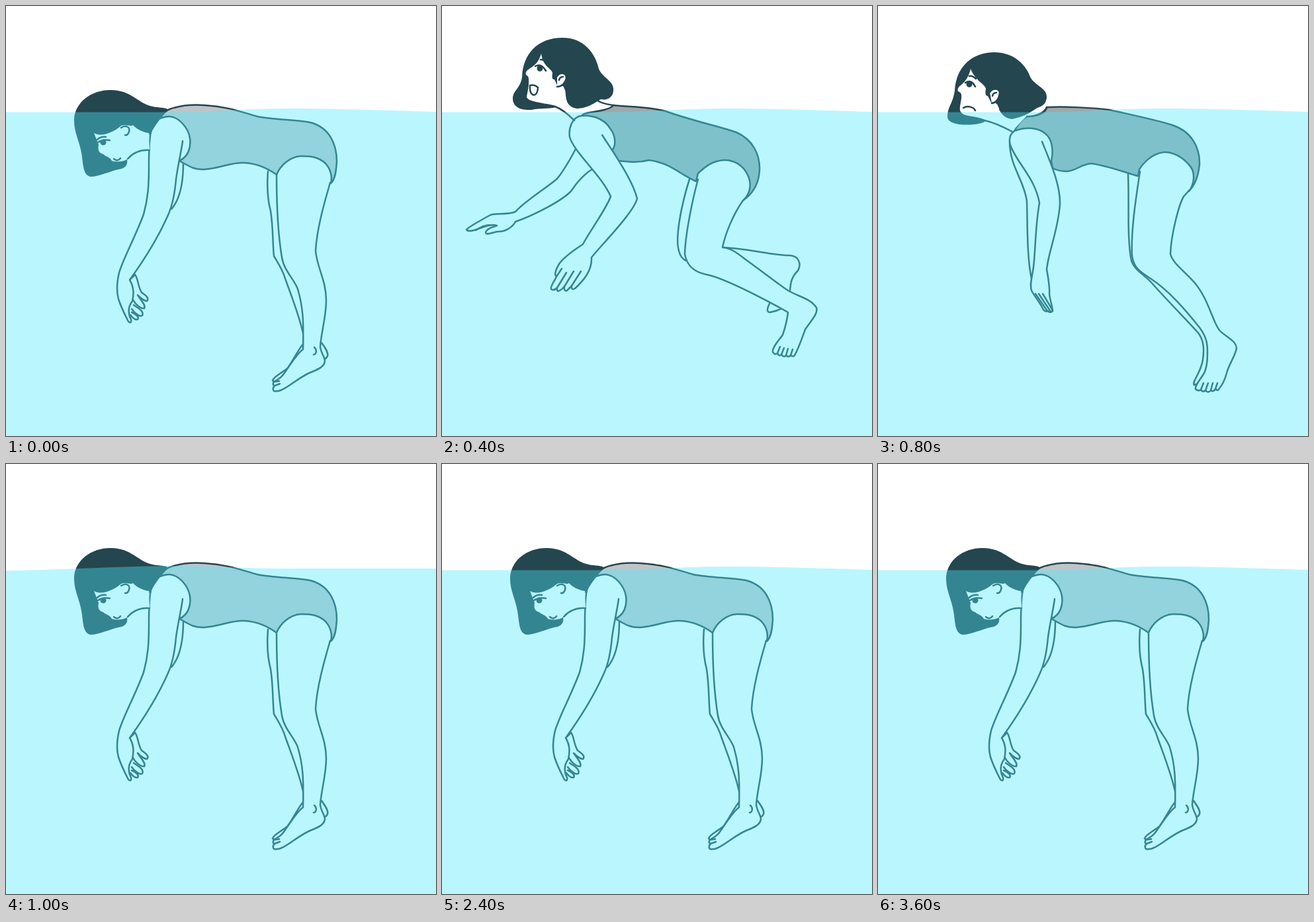
These frames come from a looping animation (650x650 px, 3.8 s). An HTML page:

```html
<!DOCTYPE html>
<html lang="en">
<head>
<meta charset="utf-8">
<title>Floating swimmer</title>
<style>
  html, body { margin: 0; width: 100%; height: 100%; overflow: hidden; background: #fff; }
  svg { display: block; width: 100%; height: 100%; }
  path { fill: none; stroke: #24464f; stroke-width: 2.5; stroke-linecap: round; stroke-linejoin: round; }
  .skin { fill: #fff; }
  .suit { fill: #9da8ab; }
  .pale { fill: #bdc5c8; }
  .ink { fill: #24464f; stroke: none; }
  .face { fill: #fff; stroke: none; }
  .water path { fill: rgb(79 232 253); fill-opacity: .39; stroke: none; }

  .pose, .water path { visibility: hidden; animation: 3.8s step-end infinite; }
  .dangle { animation-name: dangle; }
  .ready { animation-name: ready; }
  .breathe { animation-name: breathe; }
  .sink { animation-name: sink; }
  .water .swell { animation-name: swell; }
  .water .ebb { animation-name: ebb; }

  @keyframes dangle { 0%, 26.315% { visibility: visible } 5.263%, 100% { visibility: hidden } }
  @keyframes ready { 0%, 10.526%, 100% { visibility: hidden } 5.263% { visibility: visible } }
  @keyframes breathe { 0%, 21.052%, 100% { visibility: hidden } 10.526% { visibility: visible } }
  @keyframes sink { 0%, 26.315%, 100% { visibility: hidden } 21.052% { visibility: visible } }
  @keyframes swell {
    0%, 10.526%, 21.052%, 31.578%, 63.157%, 94.736% { visibility: visible }
    5.263%, 15.789%, 26.315%, 47.368%, 78.947%, 100% { visibility: hidden }
  }
  @keyframes ebb {
    0%, 10.526%, 21.052%, 31.578%, 63.157%, 94.736%, 100% { visibility: hidden }
    5.263%, 15.789%, 26.315%, 47.368%, 78.947% { visibility: visible }
  }
</style>
</head>
<body>
<svg viewBox="0 0 650 650">
  <defs>
    <g id="low-trunk">
      <path class="pale" d="M245 157C262 150 285 149 300 150C335 152 355 160 380 167C405 172 440 172 460 176C490 184 500 210 500 235C499 252 497 263 491 268C494 255 490 246 483 238C470 226 455 227 445 227C430 228 415 240 409 255C395 245 380 238 360 237C340 236 325 245 300 247C282 248 274 240 262 234C275 228 280 215 278 200C276 185 262 168 247 167C240 167 234 170 230 171Q235 163 245 157Z"/>
    </g>
    <g id="low-head">
      <path class="ink" d="M103 170C105 146 128 127 158 127C190 127 200 148 222 152C232 154 241 153 246 157C236 165 226 180 219 192L183 232Q185 242 175 246C160 248 142 258 128 258C116 256 117 240 114 222C111 204 102 190 103 170Z"/>
      <path class="face" d="M133 192C142 197 152 194 160 190C167 187 170 184 174 181C181 178 189 183 192 180C198 187 208 191 216 192L217 218C203 217 192 222 184 231C178 236 165 236 160 234C157 228 151 228 147 224C139 222 139 216 140 210Z"/>
      <path d="M217 218C203 217 192 222 184 231M138 202Q143 197 151 198M139 206Q147 201 157 203M163 231Q169 236 173 230M174 184C181 179 188 183 186 190Q184 196 180 195"/>
      <ellipse class="ink" cx="147" cy="206" rx="4.5" ry="4.5"/>
    </g>
    <g id="bent-legs">
      <path d="M374 262C362 300 352 350 358 370C360 378 364 383 369 385"/>
      <path class="skin" d="M424 365C460 366 505 378 526 377C541 378 543 392 538 400C528 410 527 418 526 430"/>
      <path d="M495 450C490 460 491 465 500 462Q508 460 514 457"/>
      <path class="skin" d="M387 262C378 295 368 345 367 375C370 392 380 402 400 406C430 412 500 450 523 463Q521 480 515 497C510 505 499 515 500 523Q503 528 507 525Q509 530 513 527Q517 532 520 528Q524 532 527 528Q531 531 533 528C538 520 543 505 549 489C558 475 569 465 566 456C557 442 540 440 523 430C505 418 485 402 460 384C448 375 438 366 424 365C428 345 440 315 455 294"/>
      <path d="M507 525l4-10M513 527l4-10M520 528l3-10M527 528l3-9"/>
    </g>
    <g id="reach-far-arm">
      <path class="skin" d="M202 216C195 230 180 255 173 262C155 277 125 295 111 311C100 316 80 313 73 316C62 322 40 334 37 338C40 343 52 338 60 335C70 331 78 330 83 332C76 334 66 338 66 343C68 347 76 342 84 341C95 342 107 334 111 326C140 316 180 295 195 280C205 265 218 252 228 246"/>
      <path d="M51 339Q62 331 74 331"/>
    </g>
    <g id="reach-near-arm">
      <path class="skin" d="M211 166C197 167 191 185 193 198C200 222 243 258 255 288C248 307 225 338 213 360C203 367 185 378 177 390C172 398 169 407 173 409C170 416 163 425 165 428Q169 431 174 426Q173 433 178 430Q182 428 185 424Q184 432 189 430L196 423Q195 430 201 427C214 415 227 400 226 380C242 360 290 312 295 291C288 262 255 215 242 195"/>
      <path d="M173 409L181 397M174 426L188 403M185 424L199 401M196 423L210 401"/>
    </g>
  </defs>

  <g class="pose dangle">
    <path d="M268 237C268 262 265 290 250 307M396 250C394 275 396 295 400 310C404 335 403 360 405 378C412 390 418 398 422 412C432 440 446 475 450 500"/>
    <path class="skin" d="M477 509C482 516 488 524 486 529Q484 534 480 533M449 511C440 522 432 540 425 548C415 556 405 560 403 566Q406 570 410 568"/>
    <path class="skin" d="M409 255C409 300 412 350 417 380C420 400 437 415 441 428C449 455 450 475 449 519C440 525 428 545 420 556Q415 563 405 568Q402 573 406 574Q402 578 405 582Q410 583 415 581C428 576 440 563 460 554C473 549 481 545 482 537C482 530 476 525 475 515C477 490 484 470 484 445C484 415 470 395 468 370C470 335 482 295 490 267"/>
    <path d="M466 516C470 519 470 526 465 527M405 568l8-1M406 574l8-3"/>
    <use href="#low-trunk"/>
    <path class="skin" d="M187 414L195 406C200 412 199 424 205 433C212 438 217 442 213 446C208 446 202 440 199 437C203 444 212 452 209 457C203 458 195 450 192 444M193 452C200 457 209 461 206 468C202 470 195 465 190 458M190 463C195 465 202 470 199 474Q194 475 188 467"/>
    <path class="skin" d="M247 167Q240 167 230 171C218 178 216 200 216 240C216 270 215 290 208 315C195 350 178 380 171 403C167 420 167 432 170 443C175 458 180 467 185 477Q190 481 189 474C184 464 185 454 191 446C193 436 194 426 187 414C208 385 230 350 245 316C250 305 255 285 257 262C260 240 265 220 267 204"/>
    <use href="#low-head"/>
  </g>

  <g class="pose ready">
    <use href="#reach-far-arm" x="20" y="1"/>
    <use href="#bent-legs" transform="translate(409 255) rotate(-10) translate(-384 -265)"/>
    <use href="#low-trunk"/>
    <use href="#reach-near-arm" x="20" y="1"/>
    <use href="#low-head"/>
  </g>

  <g class="pose breathe">
    <use href="#reach-far-arm"/>
    <use href="#bent-legs"/>
    <path class="suit" d="M259 150C285 153 310 152 338 159C380 174 420 182 445 191C470 202 481 225 480 248C479 270 468 285 455 294C465 285 468 272 464 260C457 240 440 232 425 233C405 235 395 246 387 253L384 265C360 255 345 237 313 233C298 237 285 236 267 234L257 218C264 210 262 195 254 185C245 170 228 165 211 166C215 160 235 160 245 157Q256 154 259 150Z"/>
    <use href="#reach-near-arm"/>
    <path class="ink" d="M107 140C107 128 118 125 121 108C122 72 145 48 182 48C215 48 232 72 237 95C242 108 258 112 259 125C260 138 250 143 240 141C232 146 218 155 205 155C192 154 188 145 186 135L172 153C160 156 150 154 135 157C118 158 107 152 107 140Z"/>
    <path class="face" d="M150 72C146 85 141 89 132 95Q125 99 127 104Q131 106 131 110C132 121 129 130 128 138C134 147 150 148 171 152L193 154Q188 146 187 135Q187 127 183 121L175 122L170 111Q165 112 167 101C166 95 152 91 150 72Z"/>
    <path d="M131 143C145 149 160 148 171 152C182 156 194 167 200 173M235 143C243 148 251 149 259 150M149 81Q154 81 158 85M141 91Q150 86 157 98"/>
    <path class="skin" d="M174 106C178 100 187 100 188 108C187 117 180 122 174 122M177 112Q178 107 183 107"/>
    <path class="skin" d="M133 120Q139 118 145 123C145 130 142 136 137 134Q132 131 133 120Z"/>
    <ellipse class="ink" cx="148" cy="94" rx="4.5" ry="5"/>
  </g>

  <g class="pose sink">
    <path d="M199 205C199 243 221 263 225 295C226 330 225 380 232 412"/>
    <path class="skin" d="M378 254C380 300 376 350 383 385C388 400 403 406 415 420C440 448 466 474 484 494C493 506 493 520 491 535C488 555 474 568 478 573L484 570"/>
    <path class="skin" d="M396 250C390 290 382 340 384 378C387 397 397 402 412 412C440 430 466 461 486 486C498 502 498 513 498 525C498 538 497 547 493 555C487 565 479 573 480 579Q484 583 488 580Q491 585 495 581Q499 586 503 581Q507 584 510 579Q514 583 516 578C521 572 524 566 527 555C530 542 540 530 542 517C541 505 525 500 516 490C505 475 500 445 480 420C465 402 446 390 442 375C443 345 455 300 462 288L470 279"/>
    <path d="M488 580l4-10M495 581l4-11M503 581l3-11M510 579l3-9"/>
    <path class="suit" d="M255 153C280 152 320 153 350 157C390 166 420 172 445 180C475 190 487 215 486 240C484 260 478 272 470 280C479 268 480 250 470 240C460 228 445 220 432 221C415 223 402 236 395 247L393 257C380 254 350 242 322 238C305 240 298 250 285 250Q273 250 264 245L262 235C266 215 262 200 253 193C243 184 225 182 206 189C212 178 220 170 225 167C240 167 254 162 255 153Z"/>
    <path class="skin" d="M206 189C198 195 198 203 200 210C208 235 238 260 244 298C238 330 238 370 235 395C233 410 229 420 232 430C236 438 245 448 250 459Q253 463 257 461Q260 465 264 461C264 455 260 445 259 435C260 425 258 415 255 398C258 370 272 340 275 300C276 270 260 235 248 205"/>
    <path d="M238 435L256 461M243 435L261 462M249 435L264 460"/>
    <path class="ink" d="M105 168C105 152 113 148 116 128C118 92 142 70 176 70C208 70 225 92 230 107C236 120 256 124 255 138C254 150 246 152 241 154C230 161 215 171 203 171C190 170 183 160 180 148L161 175Q155 178 145 179C125 181 106 178 105 168Z"/>
    <path class="face" d="M140 95C137 107 133 113 126 119Q119 124 121 129Q125 130 126 134C127 142 123 150 124 158C128 168 145 167 162 173L190 174Q182 164 183 155Q181 149 177 146L171 146L166 136Q161 137 163 125C162 118 147 113 140 95Z"/>
    <path class="face" d="M203 171Q226 166 241 154L255 153Q248 166 224 167L205 187Z"/>
    <path d="M127 165C140 169 150 168 161 173C175 176 190 183 203 190M255 153C252 161 240 167 225 167M129 154C136 150 145 153 147 158M138 106Q143 105 148 110M132 116Q141 110 147 122"/>
    <path class="skin" d="M169 130C173 124 183 124 184 131C183 140 179 146 172 147M173 136Q174 131 179 131"/>
    <ellipse class="ink" cx="138" cy="118" rx="4.5" ry="5"/>
  </g>

  <g class="water">
    <path class="swell" d="M0 160.5L250 160.5C330 159 370 155 430 155S560 157 650 160V650H0Z"/>
    <path class="ebb" d="M0 161.5C90 159.5 180 154.5 250 154S350 158 420 158L650 158V650H0Z"/>
  </g>
</svg>
</body>
</html>
```
